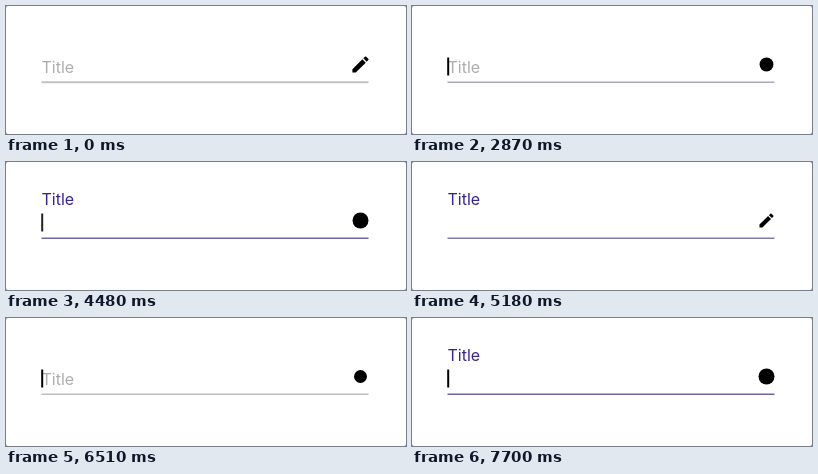
Recreate the animation shown at these times as an HTML page. Size 400 px wide and 128 px high, loop 8000 ms.

```html
<!DOCTYPE html>
<html lang="en">
<head>
<meta charset="utf-8">
<title>Floating label text field</title>
<style>
  html, body { margin: 0; width: 100%; height: 100%; overflow: hidden; background: #777; }
  svg { display: block; width: 400px; height: 128px; }
  text { font: 400 16px Inter, Roboto, sans-serif; }
</style>
</head>
<body>
<svg viewBox="0 0 400 128">
  <rect width="400" height="128" rx="2" fill="#fff"/>
  <rect id="line" x="35.5" width="327"/>
  <text id="label" x="35.5">Title</text>
  <rect id="caret" x="35.2" y="51.5" width="2" height="18"/>
  <g id="icon">
    <circle id="dot" r="8"/>
    <path id="pencil" transform="scale(.9) translate(-12 -12)" d="M3 17.25V21h3.75L17.81 9.94l-3.75-3.75L3 17.25zM20.71 7.04c.39-.39.39-1.02 0-1.41l-2.34-2.34c-.39-.39-1.02-.39-1.41 0l-1.83 1.83 3.75 3.75 1.83-1.83z"/>
  </g>
</svg>
<script>
const LOOP = 8000, TICK = 70, BLINK = 1050;
const GRAY = [174, 174, 174], INDIGO = [52, 36, 150];
const LINE_OFF = [176, 176, 176], LINE_ON = [74, 66, 136];

// at: moment of the switch, blink: start of the first caret fade
const switches = [
  { at: -1000, focus: false },
  { at: 2820, focus: true, blink: 3400 },
  { at: 5130, focus: false },
  { at: 6505, focus: true, blink: 7040 }
];

const el = id => document.getElementById(id);
const [line, label, caret, icon, dot, pencil] =
  ['line', 'label', 'caret', 'icon', 'dot', 'pencil'].map(el);

const clamp = x => Math.max(0, Math.min(1, x));
const ease = x => x * x * (3 - 2 * x);
const mix = (a, b, p) => a + (b - a) * p;
const color = (a, b, p) => `rgb(${a.map((v, i) => Math.round(mix(v, b[i], p)))})`;
const set = (node, attrs) => {
  for (const key in attrs) node.setAttribute(key, attrs[key]);
};

function caretAlpha(t, state) {
  if (!state.focus) return 0;
  if (t < state.blink) return 1;
  const u = (t - state.blink) % BLINK;
  return u < 490 ? clamp(1 - u / 220) : clamp((u - 490) / 170);
}

function draw(time) {
  const t = Math.floor(time / TICK) * TICK;
  const state = switches.filter(s => s.at <= t).pop();
  const since = t - state.at;
  const toward = p => state.focus ? p : 1 - p;

  const rise = toward(ease(clamp((since - 30) / 300)));
  const tint = toward(clamp(since / 200));
  const scale = mix(0.8, 1, clamp(since / 150));
  const thick = t < 140;

  set(label, { y: mix(67, 42.5, rise), fill: color(GRAY, INDIGO, clamp(rise * 1.3)) });
  set(line, {
    y: thick ? 75.2 : 75.6,
    height: thick ? 2 : 1.2,
    fill: thick ? '#c2c2c2' : color(LINE_OFF, LINE_ON, tint)
  });
  set(caret, { opacity: caretAlpha(t, state) });
  set(icon, { transform: `translate(354.5 58.5) scale(${scale})` });
  set(dot, { opacity: state.focus ? 1 : 0 });
  set(pencil, { opacity: state.focus ? 0 : 1 });
}

const start = performance.now();
function loop() {
  draw((performance.now() - start) % LOOP);
  requestAnimationFrame(loop);
}
loop();
</script>
</body>
</html>
```
